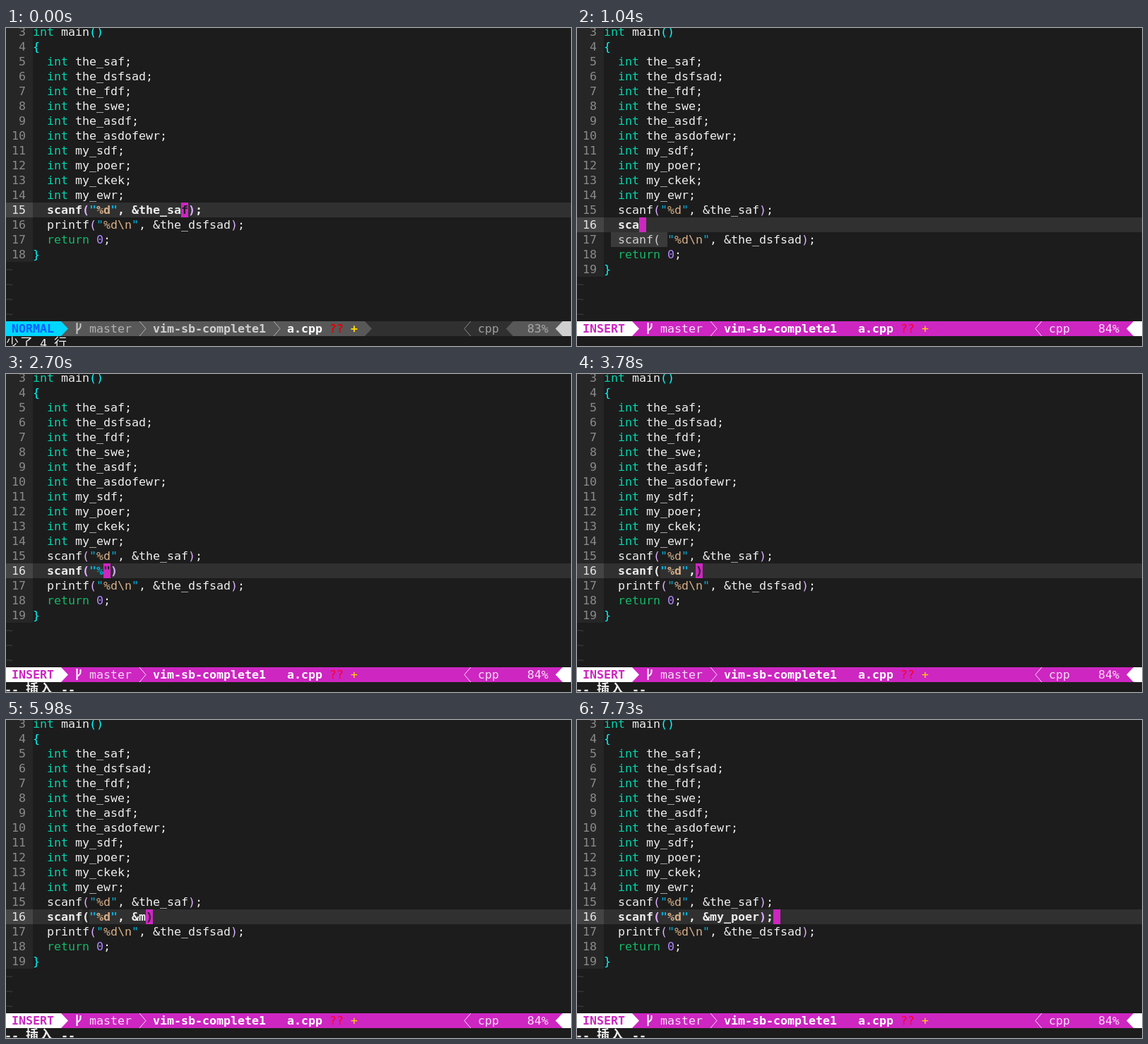
Write an HTML page that moves like this. It is 800 px wide and 450 px high and loops after 8 s.

```html
<!DOCTYPE html>
<html lang="en">
<head>
<meta charset="utf-8">
<title>Typing in an editor</title>
<style>
html, body { margin: 0; width: 100%; height: 100%; overflow: hidden; background: #1c1c1c; }
svg { display: block; width: 100%; height: 100%; }
text { font: 16.61px "DejaVu Sans Mono", "Noto Sans CJK SC", "Noto Sans CJK", monospace; white-space: pre; }
text.b { font-weight: bold; }
text.cjk { font-family: "Noto Sans CJK SC", "Noto Sans CJK", sans-serif; font-size: 18px; }
</style>
</head>
<body>
<svg id="stage" viewBox="0 0 800 450"></svg>
<script>
const LOOP = 8000, CELL = 10, ROW = 21, LEFT = 38;
const MAGENTA = '#cd26c1', BG = '#1c1c1c', WHITE = '#eeeeee';
const RAINBOW = ['#00ffff', '#dfafff', '#6f9fff'];

const HEAD = ['int main()', '{']
  .concat(['the_saf', 'the_dsfsad', 'the_fdf', 'the_swe', 'the_asdf', 'the_asdofewr',
    'my_sdf', 'my_poer', 'my_ckek', 'my_ewr'].map(v => `  int ${v};`));
const SCAN = '  scanf("%d", &the_saf);';
const TAIL = ['  printf("%d\\n", &the_dsfsad);', '  return 0;', '}'];

// Start time, typed line with | as the cursor, completion list
const STEPS = [
  [210, '|'], [750, 's|'], [840, 'sc|'], [1000, 'sca|'], [1040, 'sca|', ['scanf(']],
  [1400, 'scanf(|'], [2150, 'scanf()|'], [2250, 'scanf(|)'], [2340, 'scanf("|")'],
  [2700, 'scanf("%|")'], [2800, 'scanf("%d|")'], [3090, 'scanf("%d"|)'],
  [3780, 'scanf("%d",|)'], [3830, 'scanf("%d", |)'], [4360, 'scanf("%d", &|)'],
  [5980, 'scanf("%d", &m|)'], [6260, 'scanf("%d", &my|)'], [6460, 'scanf("%d", &my_|)'],
  [6500, 'scanf("%d", &my_|)', ['my_poer', 'my_sdf', 'my_ckek', 'my_ewr']],
  [7090, 'scanf("%d", &my_poer|)'], [7730, 'scanf("%d", &my_poer);|']
];

const esc = s => s.replace(/&/g, '&amp;').replace(/</g, '&lt;');
const rect = (x, y, w, h, fill) => `<rect x="${x}" y="${y}" width="${w}" height="${h}" fill="${fill}"/>`;
const text = (x, top, s, fill, cls = '') =>
  `<text x="${x}" y="${top + 16}" fill="${fill}" class="${cls}">${esc(s)}</text>`;
const poly = (points, fill) => `<polygon points="${points}" fill="${fill}"/>`;
const stroke = (d, color, w = 1) => `<path d="${d}" fill="none" stroke="${color}" stroke-width="${w}"/>`;
const rowTop = n => 268 + (n - 16) * ROW;

// One colour per character; the stack carries open brackets across lines
function colorize(line, stack) {
  const colors = Array(line.length).fill(WHITE);
  const paint = (re, color) => {
    for (const m of line.matchAll(re)) colors.fill(color, m.index, m.index + m[0].length);
  };
  paint(/\bint\b/g, '#00d7af');
  paint(/\breturn\b/g, '#14b867');
  paint(/\b\d+\b/g, '#af87ff');
  paint(/"[^"]*"?/g, '#00afd7');
  paint(/%d|\\n/g, '#d7af87');
  [...line].forEach((c, i) => {
    if ('({'.includes(c)) {
      colors[i] = RAINBOW[stack.length % 3];
      stack.push(c);
    } else if (')}'.includes(c) && stack[stack.length - 1] === (c === ')' ? '(' : '{')) {
      stack.pop();
      colors[i] = RAINBOW[stack.length % 3];
    }
  });
  return colors;
}

function codeLine(line, top, colors, cls) {
  let out = '';
  for (let i = 0, j; i < line.length; i = j) {
    for (j = i + 1; j < line.length && colors[j] === colors[i]; j++);
    const run = line.slice(i, j), pad = run.length - run.trimStart().length;
    if (run.trim()) out += text(LEFT + (i + pad) * CELL, top, run.trim(), colors[i], cls);
  }
  return out;
}

function buffer(lines, active, col) {
  const stack = [];
  let out = rect(0, 0, LEFT, rowTop(lines.length + 3), '#262626');
  lines.forEach((line, i) => {
    const n = i + 3, top = rowTop(n), on = n === active;
    const colors = colorize(line, stack);
    if (on) {
      out += rect(0, top, LEFT, ROW, '#444444') + rect(LEFT, top, 762, ROW, '#303030');
      if (line[col] === ')') {
        const open = line.indexOf('(');
        colors[open] = WHITE;
        out += rect(LEFT + open * CELL, top, CELL, ROW, '#262626');
      }
      out += rect(LEFT + col * CELL, top, CELL, ROW, MAGENTA);
      if (col < line.length) colors[col] = BG;
    }
    out += text(n < 10 ? 18 : 8, top, String(n), on ? '#e4e4e4' : '#8a8a8a');
    out += codeLine(line, top, colors, on ? 'b' : '');
  });
  for (let n = lines.length + 3; n < 23; n++) out += text(0, rowTop(n), '~', '#3a3a3a');
  return out;
}

function popup(items, col) {
  const x = LEFT + col * CELL;
  const w = (Math.max(...items.map(s => s.length)) + 2) * CELL;
  return items.map((s, i) => {
    const top = rowTop(17 + i);
    return rect(x - CELL, top, w, ROW, '#3a3a3a') + text(x, top, s, '#d0d0d0');
  }).join('');
}

function status(insert) {
  const y = 415, mid = y + ROW / 2, end = y + ROW;
  const mode = insert ? '#ffffff' : '#00d7ff';
  const bar = insert ? MAGENTA : '#585858';
  const soft = insert ? '#f8dcf5' : '#b2b2b2';
  const right = x => `${x},${y} ${x + 10},${mid} ${x},${end}`;
  const left = x => `${x + 10},${y} ${x},${mid} ${x + 10},${end}`;
  const last = insert ? '#ffffff' : '#d0d0d0';
  const mark = insert ? '' : 'b';
  return rect(0, y, 800, ROW, insert ? MAGENTA : '#303030')
    + rect(78, y, 430, ROW, bar) + poly(right(508), bar)
    + rect(718, y, 70, ROW, bar) + poly(left(708), bar)
    + rect(0, y, 78, ROW, mode) + poly(right(78), mode)
    + rect(788, y, 12, ROW, last) + poly(left(778), last)
    + stroke(`M189 ${y}L198 ${mid}L189 ${end}`, soft)
    + (insert ? '' : stroke(`M379 ${y}L388 ${mid}L379 ${end}`, soft))
    + stroke(`M658 ${y}L649 ${mid}L658 ${end}`, insert ? soft : '#8a8a8a')
    + stroke('M100.5 417V433M105.5 418V422Q105.5 425 100.5 428', insert ? '#ffffff' : '#c6c6c6', 2)
    + text(8, y, insert ? 'INSERT' : 'NORMAL', insert ? MAGENTA : '#005fff', 'b')
    + text(118, y, 'master', soft)
    + text(208, y, 'vim-sb-complete1', insert ? '#ffffff' : '#d0d0d0', 'b')
    + text(398, y, 'a.cpp', '#ffffff', 'b')
    + text(458, y, '??', insert ? '#ff0020' : '#e00000', mark)
    + text(488, y, '+', '#ffd700', mark)
    + text(668, y, 'cpp', insert ? soft : '#9e9e9e')
    + text(738, y, insert ? '84%' : '83%', insert ? soft : '#a8a8a8');
}

function message(insert) {
  const y = 436;
  if (!insert) {
    return text(0, y, '少', WHITE, 'cjk') + text(20, y, '了', WHITE, 'cjk')
      + text(48, y, '4', WHITE) + text(68, y, '行', WHITE, 'cjk');
  }
  return text(-2, y, '--', WHITE, 'b') + text(28, y, '插', WHITE, 'cjk b')
    + text(48, y, '入', WHITE, 'cjk b') + text(78, y, '--', WHITE, 'b');
}

function scene(t) {
  const step = STEPS.filter(s => s[0] <= t).pop();
  if (!step) {
    return buffer([...HEAD, SCAN, ...TAIL], 15, 21) + status(false) + message(false);
  }
  const [, typed, items] = step;
  const col = 2 + typed.indexOf('|');
  const line = '  ' + typed.replace('|', '');
  let out = buffer([...HEAD, SCAN, line, ...TAIL], 16, col);
  if (items) out += popup(items, line.search(/\w+\W*$/));
  return out + status(t >= 250) + (items ? '' : message(true));
}

const stage = document.getElementById('stage');
const start = performance.now();
let shown = '';
function draw() {
  const next = scene((performance.now() - start) % LOOP);
  if (next !== shown) stage.innerHTML = shown = next;
  requestAnimationFrame(draw);
}
draw();
</script>
</body>
</html>
```
